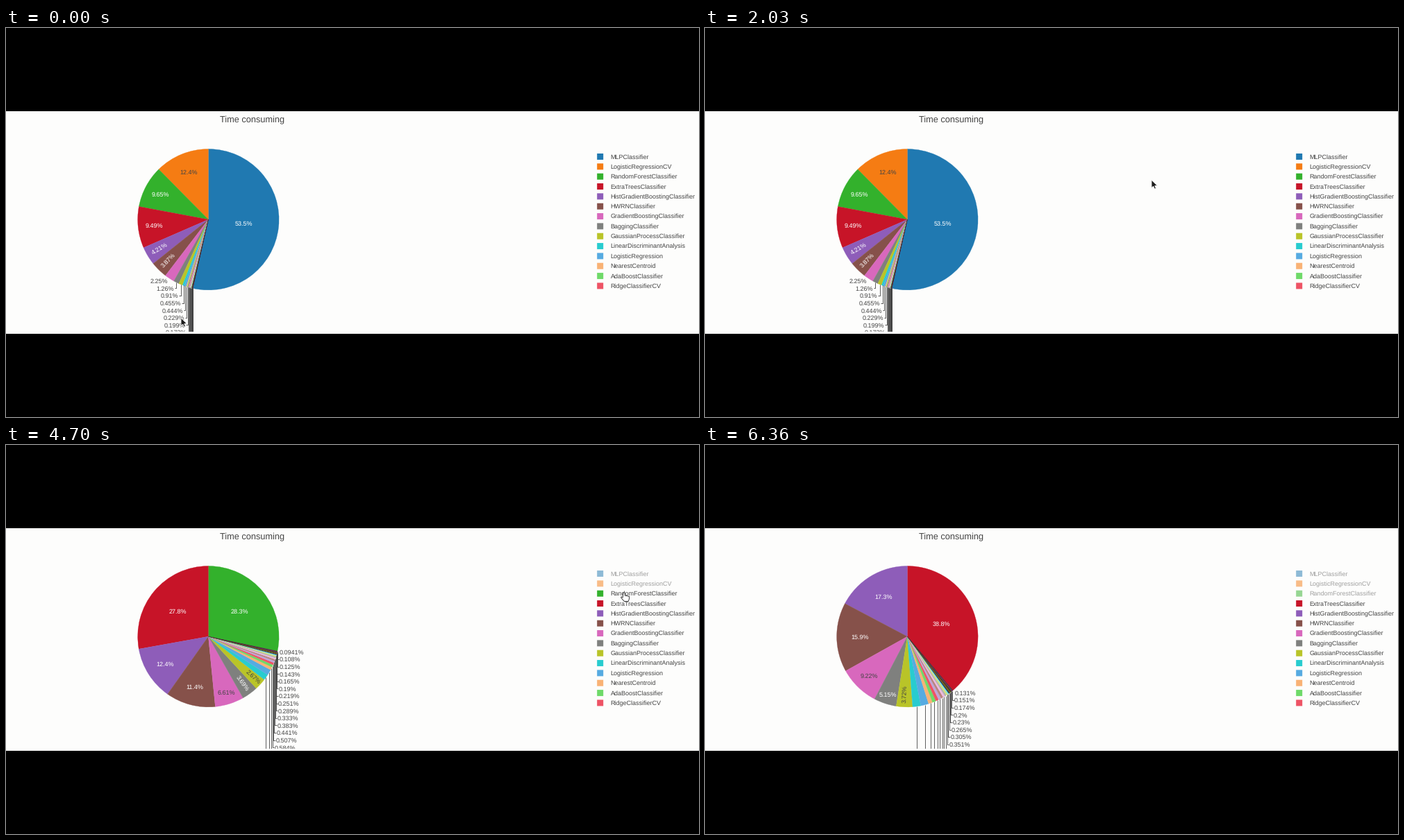
Animation of 998 by 561 pixels, one loop 6.44 s. Source, as a matplotlib script:

```python
import colorsys

import numpy as np
import matplotlib.pyplot as plt
from matplotlib.animation import FuncAnimation
from matplotlib.collections import LineCollection
from matplotlib.colors import to_rgb
from matplotlib.patches import Polygon, Rectangle, Wedge

W, H, DPI = 998, 561, 64
LOOP, STEP = 6440, 35
CX, CY, R = 291.4, 276.2, 101.7
PAGE, INK = "#fdfdfc", "#444444"
FONT, TITLE_FONT, TIP_FONT = 9.03, 12.75, 9.85

plt.rcParams["font.family"] = "Liberation Sans"
plt.rcParams["text.hinting"] = "none"

NAMES = ["MLPClassifier", "LogisticRegressionCV", "RandomForestClassifier",
         "ExtraTreesClassifier", "HistGradientBoostingClassifier",
         "HWRNClassifier", "GradientBoostingClassifier", "BaggingClassifier",
         "GaussianProcessClassifier", "LinearDiscriminantAnalysis",
         "LogisticRegression", "NearestCentroid", "AdaBoostClassifier",
         "RidgeClassifierCV"]

# Leading shares, then a geometric tail of quick models.
LEAD = [157.08, 36.4, 28.32, 27.8379, 12.367, 11.365, 6.61, 3.69, 2.6695,
        1.335, 1.302]
SHARES = np.append(LEAD, .672 * .869 ** np.arange(15))
SECONDS = SHARES * .1081559658 / SHARES[4]

BASE = ["#2079b1", "#f57c13", "#33b12c", "#c71428", "#8e5db9",
        "#86514a", "#d868bd", "#7f807e", "#b9c428", "#28cccf"]


def shade(color, step):
    h, l, s = colorsys.rgb_to_hls(*to_rgb(color))
    return colorsys.hls_to_rgb(h, np.clip(l + step, 0, 1), s)


COLORS = [shade(c, d) for d in (0, .2, -.2) for c in BASE]

CLICKS = [3200, 3800, 4720]   # each hides the next legend entry
GONE = 6330                   # cursor leaves the stage
LAG = 90                      # hover label trails the cursor
PATH = [(180, 252, 418), (840, 246, 283), (1360, 258, 215), (1500, 280, 212),
        (2030, 643, 219), (2650, 888, 190), (3200, 889, 193),
        (3650, 890, 207), (4100, 890, 207), (4300, 890, 213),
        (4750, 890, 213), (4950, 335, 288), (5060, 327, 289),
        (5330, 235, 275), (5600, 250, 322), (6200, 286, 365),
        (6330, 287, 415)]
TIMES, XS, YS = np.transpose(PATH)

fig = plt.figure(figsize=(W / DPI, H / DPI), dpi=DPI, facecolor="black")
ax = fig.add_axes([0, 0, 1, 1])
ax.set(xlim=(0, W), ylim=(H, 0))
ax.axis("off")


def pt(px):
    return px * 72 / DPI


def label(x, y, s, size=FONT, color=INK, ha="left", z=4, **kw):
    """Text whose capitals are centred on y."""
    return ax.text(x, y + .35 * size, s, fontsize=pt(size), color=color,
                   ha=ha, va="baseline", zorder=z, **kw)


def box(x0, y0, x1, y1, color, z, **kw):
    return ax.add_patch(Rectangle((x0, y0), x1 - x0, y1 - y0, fc=color,
                                  lw=0, zorder=z, **kw))


def text_color(i):
    bright = np.dot(to_rgb(COLORS[i]), (.299, .587, .114)) > .55
    return INK if bright else "white"


def percent(p):
    return f"{100 * p:.3g}%"


def slices(first):
    """(index, fraction, start, end), degrees clockwise from the top."""
    frac = SHARES[first:] / SHARES[first:].sum()
    ends = 360 * (1 + frac[0] - np.cumsum(frac))
    ends[0] = 360 * frac[0]
    starts = np.append(0, ends[1:])
    tops = np.append(ends[0], 360 * (1 + frac[0] - np.cumsum(frac)[:-1]))
    return list(zip(range(first, len(SHARES)), frac, starts, tops))


def polar(deg, r):
    a = np.radians(deg)
    return CX + r * np.sin(a), CY - r * np.cos(a)


def inscribed(p):
    """Radius of the largest circle that fits a slice, as a share of R."""
    s = np.sin(np.pi * p) if p < .5 else 1
    return min(s / (1 + s), .5)


def inner_label(i, p, mid):
    rin = inscribed(p)
    if rin > .13:
        x, y = polar(mid, R * (1 - rin))
        return label(x, y, percent(p), color=text_color(i), ha="center")
    aspect = 2.35
    q = aspect + .5 / np.tan(np.pi * p)
    half = 1 / (np.sqrt(q * q + .5) + q)
    x, y = polar(mid, R * (np.cos(half) - half * aspect))
    turn = 90 - mid if mid < 180 else 270 - mid
    return ax.text(x, y, percent(p), fontsize=pt(FONT), color=text_color(i),
                   ha="center", va="center", rotation=turn, zorder=4)


def outer_labels(items):
    """Labels beside the rim, pushed down so that they never overlap."""
    arts, lines = [], []
    for side in (-1, 1):
        group = [(p, m) for p, m in items if (m < 180) == (side > 0)]
        last = -99
        for p, mid in group[::-side]:
            x, y = polar(mid, R)
            want = y - 4.4 * np.cos(np.radians(mid))
            ly = max(want, last + 10.6)
            last = ly
            if ly > want:
                end = min(ly, 450)
                lines.append([(x, y), (x, end), (x + 2.5 * side, end)])
            if ly < 446:
                arts.append(label(x + 3 * side, ly, percent(p),
                                  ha="left" if side > 0 else "right"))
    arts.append(ax.add_collection(
        LineCollection(lines, colors=INK, linewidths=pt(.85), zorder=3)))
    return arts


def legend(first):
    arts = []
    for i, name in enumerate(NAMES):
        y = 185.4 + 14.34 * i
        alpha = .5 if i < first else 1
        arts += [box(851.2, y - 4.4, 860.2, y + 4.6, COLORS[i], 2,
                     alpha=alpha, snap=False),
                 label(870.7, y, name, alpha=alpha)]
    return arts


def build(first):
    arts, outside = legend(first), []
    for i, p, a, b in slices(first):
        c = COLORS[i]
        arts.append(ax.add_patch(Wedge((CX, CY), R, a - 90, b - 90, fc=c,
                                       ec=c, lw=pt(.3), zorder=2)))
        if p > .025:
            arts.append(inner_label(i, p, (a + b) / 2))
        else:
            outside.append((p, (a + b) / 2))
    return arts + outer_labels(outside)


box(0, 120, W, 441, PAGE, 0)
box(0, 438.4, W, 441, PAGE, 6)
box(0, 441, W, H, "black", 6)
label(307.7, 132, "Time consuming", TITLE_FONT)
scenes = [build(k) for k in range(len(CLICKS) + 1)]

tip = ax.add_patch(Polygon([(0, 0)] * 3, ec="white", lw=pt(.75), zorder=8))
tip_text = [label(0, 0, "", TIP_FONT, z=9) for _ in range(3)]

ARROW = np.array([(0, 0), (0, 11.6), (2.7, 9.3), (4.5, 13.2), (6.5, 12.3),
                  (4.8, 8.6), (8.4, 8.3)])
HAND = np.array([(-1, 0), (1, 0), (1.2, 4), (7.6, 5.4), (7.6, 8.6),
                 (6.2, 12.4), (.2, 12.4), (-4.4, 7), (-3.8, 5.8), (-1.8, 7)])
arrow = ax.add_patch(Polygon(ARROW, fc="#1c1c1c", ec="#f4f4f4", lw=pt(.9),
                             zorder=12))
hand = ax.add_patch(Polygon(HAND, fc="white", ec="#333333", lw=pt(.9),
                            joinstyle="round", zorder=12))


def cursor(t):
    return np.array([np.interp(t, TIMES, XS), np.interp(t, TIMES, YS)])


def stage(t):
    return sum(t >= c for c in CLICKS)


def hovered(t):
    x, y = cursor(t - LAG) - (CX, CY)
    if np.hypot(x, y) > R:
        return None
    deg = np.degrees(np.arctan2(x, -y)) % 360
    return next((s for s in slices(stage(t))
                 if s[2] <= deg < s[3] and s[0] < len(NAMES)), None)


def show_tip(item):
    for a in [tip, *tip_text]:
        a.set_visible(item is not None)
    if item is None:
        return
    i, p, a, b = item
    mid, rin = (a + b) / 2, inscribed(p)
    side = 1 if mid < 180 else -1
    x, y = polar(mid, R * (1 - rin))
    x += side * rin * R
    rows = [NAMES[i], f"{SECONDS[i]:.10f}", percent(p)]
    for k, (line, s) in enumerate(zip(tip_text, rows)):
        line.set(text=s, color=text_color(i),
                 ha="left" if side > 0 else "right")
        line.set_position((x + side * 6.6,
                           y + 12.7 * (k - 1) + .35 * TIP_FONT))
    wide = max(s.get_window_extent().width for s in tip_text) + 5
    near, far = x + side * 4.6, x + side * (4.6 + wide)
    h, d = 20.2, 4.5
    tip.set_xy([(x, y), (near, y + d), (near, y + h), (far, y + h),
                (far, y - h), (near, y - h), (near, y - d)])
    tip.set_facecolor(COLORS[i])


def draw(n):
    t = n * STEP
    now = stage(t)
    for k, arts in enumerate(scenes):
        for a in arts:
            a.set_visible(k == now)
    show_tip(hovered(t))

    pos = cursor(t)
    over = pos[0] > 846
    arrow.set_visible(not over and t < GONE)
    hand.set_visible(over)
    arrow.set_xy(ARROW + pos)
    hand.set_xy(HAND + pos)
    return []


anim = FuncAnimation(fig, draw, frames=LOOP // STEP, interval=STEP,
                     repeat=True, repeat_delay=0, init_func=lambda: [],
                     blit=False)
plt.show()
```
